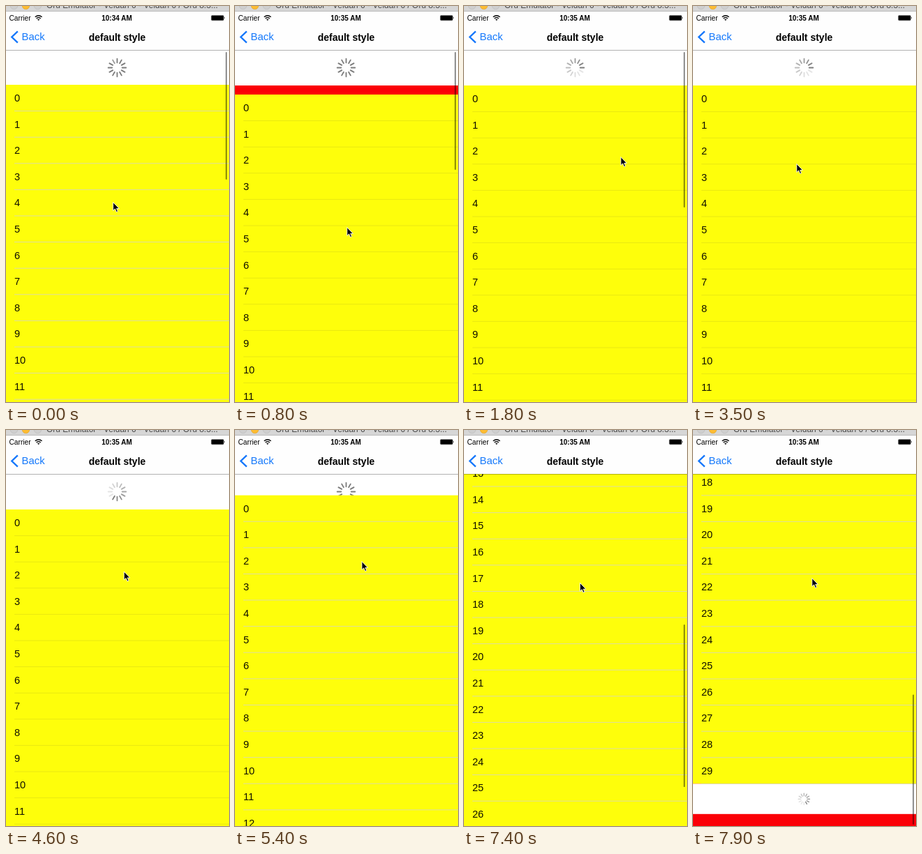
Animation of 320x568 px, one loop 8000 ms. Source, as an HTML page:

```html
<!DOCTYPE html>
<html lang="en">
<head>
<meta charset="utf-8">
<title>Pull to refresh</title>
<style>
  html, body { margin: 0; width: 100%; height: 100%; overflow: hidden; background: #fff; }
  svg { display: block; width: 320px; height: 568px; font-family: "Liberation Sans", Arial, sans-serif; }
  .row { font-size: 14.6px; fill: #111100; }
  .line { stroke: #e9e812; stroke-width: 1; }
  .pale .line { stroke: #dddda0; }
  .spokes { stroke: #7c7c7c; stroke-linecap: round; }
</style>
</head>
<body>
<svg viewBox="0 0 320 568">
  <rect y="63" width="320" height="505" fill="#fb0007"/>
  <rect y="63" width="320" height="51" fill="#fff"/>
  <g id="headSpin" class="spokes" transform="translate(159.5 88.5)" stroke-width="1.8"/>

  <g id="list">
    <rect width="320" height="1128" fill="#fefe0b"/>
    <rect y="1128" width="320" height="43.4" fill="#fff"/>
    <g id="footSpin" class="spokes" transform="translate(159.3 1150)" stroke-width="1.3"/>
  </g>

  <rect id="bar" x="315.2" width="1.9" rx=".9" fill="#000" fill-opacity=".48"/>

  <!-- window title bar -->
  <rect width="320" height="8" fill="#d6d6d6"/>
  <rect y="7.3" width="320" height=".7" fill="#b4b4b4"/>
  <g stroke-width=".6">
    <circle cx="11.5" cy="-.6" r="5.3" fill="#cfcfcf" stroke="#b9b9b9"/>
    <circle cx="28.5" cy="-.6" r="5.3" fill="#fdbc32" stroke="#dfa023"/>
    <circle cx="45.5" cy="-.6" r="5.3" fill="#cfcfcf" stroke="#b9b9b9"/>
  </g>
  <text x="58" y="3.4" font-size="12" fill="#4a4a4a">Oru Emulator - Veldan 6 - Veldan 6 / Oru 8.3...</text>

  <!-- status and navigation bars -->
  <rect y="8" width="320" height="55" fill="#fefefe"/>
  <rect y="63" width="320" height="1" fill="#000" fill-opacity=".3"/>
  <text x="4.5" y="20.6" font-size="10.2">Carrier</text>
  <g fill="none" stroke="#000" stroke-width="1.4">
    <path d="M41.8 15.8Q46.7 11.6 51.6 15.8"/>
    <path d="M43.7 17.9Q46.7 15.4 49.7 17.9"/>
  </g>
  <path d="M45 19.3Q46.7 18 48.4 19.3L46.7 21Z"/>
  <text id="clock" x="159" y="20.7" font-size="10" font-weight="bold" text-anchor="middle"></text>
  <rect x="294.6" y="13.4" width="17.8" height="7.4" rx="1.4" fill="#000" stroke="#777" stroke-width=".6"/>
  <path d="M313.2 15.6Q314.8 17 313.2 18.6Z"/>
  <path d="M16.8 36.4L8.3 44.5L16.8 52.6" fill="none" stroke="#1478fb" stroke-width="2.4"/>
  <text x="22.5" y="49.4" font-size="14.9" fill="#1478fb">Back</text>
  <text x="159.5" y="49.7" font-size="14" font-weight="bold" text-anchor="middle">default style</text>

  <path id="cursor" d="M0 0V12L2.8 9.4L4.7 14L6.8 13.1L4.9 8.9H8.6Z" fill="#000" stroke="#fff" stroke-width=".9"/>
</svg>
<script>
  const LOOP = 8000, STEP = 100, ROW = 37.6, ROWS = 30, NAV = 63, HEADER = 51;
  const $ = id => document.getElementById(id);

  function add(parent, tag, attrs, text) {
    const el = document.createElementNS("http://www.w3.org/2000/svg", tag);
    for (const k in attrs) el.setAttribute(k, attrs[k]);
    if (text !== undefined) el.textContent = text;
    parent.appendChild(el);
    return el;
  }

  for (let i = 0; i < ROWS; i++) {
    const y = i * ROW, end = y + ROW;
    add($("list"), "text", { class: "row", x: 12, y: y + 23.9 }, i);
    add($("list"), "line", { class: "line", x1: 12, x2: 320, y1: end, y2: end });
  }

  function makeSpinner(group, inner, outer) {
    return Array.from({ length: 12 }, (_, i) =>
      add(group, "line", { y1: -inner, y2: -outer, transform: `rotate(${i * 30})` }));
  }
  const headSpin = makeSpinner($("headSpin"), 7.2, 12.8);
  const footSpin = makeSpinner($("footSpin"), 4.6, 8.2);

  function spin(spokes, t) {
    const head = 3 + Math.round((t - 1800) / 850 * 12);
    spokes.forEach((s, i) => {
      const age = (((head - i) % 12) + 12) % 12;
      s.setAttribute("opacity", Math.max(.2, 1 - age / 12));
    });
  }

  // Eased value between [time, value] keys
  function track(keys, t) {
    const i = keys.findIndex(k => k[0] > t);
    if (i < 0) return keys[keys.length - 1][1];
    if (i === 0) return keys[0][1];
    const [t0, a] = keys[i - 1], [t1, b] = keys[i];
    const u = (t - t0) / (t1 - t0);
    return a + (b - a) * u * u * (3 - 2 * u);
  }

  const topKeys = [[0, 113], [800, 127], [900, 127.2], [1300, 114], [5227, 114],
                   [5627, 63], [6300, 63], [6400, 55.2], [7900, -620.6]];
  const xKeys = [[0, 153.7], [800, 160.8], [1000, 161], [1800, 225], [3500, 148.8], [5400, 182], [6400, 153.8], [7900, 170.8]];
  const yKeys = [[0, 281.5], [800, 317.5], [1000, 317.5], [1800, 216.5], [3500, 226.5], [5400, 188.5], [6400, 238.5], [7900, 212.5]];
  const barKeys = [[1900, 1], [2300, 0], [6200, 0], [6300, 1]];

  function drawBar(t, top, refreshing) {
    const full = refreshing ? 223 : 233;
    const scrolled = NAV + (refreshing ? HEADER : 0) - top;
    const range = 637;
    const over = Math.max(0, -scrolled, scrolled - range);
    const len = full - over;
    const part = Math.min(1, Math.max(0, scrolled / range));
    $("bar").setAttribute("y", 66 + part * (500 - len));
    $("bar").setAttribute("height", len);
    $("bar").setAttribute("opacity", track(barKeys, t));
  }

  function draw(t) {
    const top = track(topKeys, t);
    const refreshing = t >= 1000 && t < 5200;
    const pale = t < 400 || (t >= 5200 && t < 5900) || t >= 7000;

    $("list").setAttribute("transform", `translate(0 ${top})`);
    $("list").setAttribute("class", pale ? "pale" : "");

    if (refreshing) spin(headSpin, t);
    else {
      const pull = t < 1000 ? (top - NAV) / HEADER * 12 : 12;
      headSpin.forEach((s, i) => s.setAttribute("opacity", Math.min(1, Math.max(0, pull - i))));
    }
    spin(footSpin, t);
    drawBar(t, top, refreshing);

    $("clock").textContent = t < 400 ? "10:34 AM" : "10:35 AM";
    $("cursor").setAttribute("transform", `translate(${track(xKeys, t)} ${track(yKeys, t)})`);
  }

  const start = performance.now();
  function tick() {
    const t = (performance.now() - start) % LOOP;
    draw(Math.floor(t / STEP) * STEP);
    requestAnimationFrame(tick);
  }
  tick();
</script>
</body>
</html>
```
